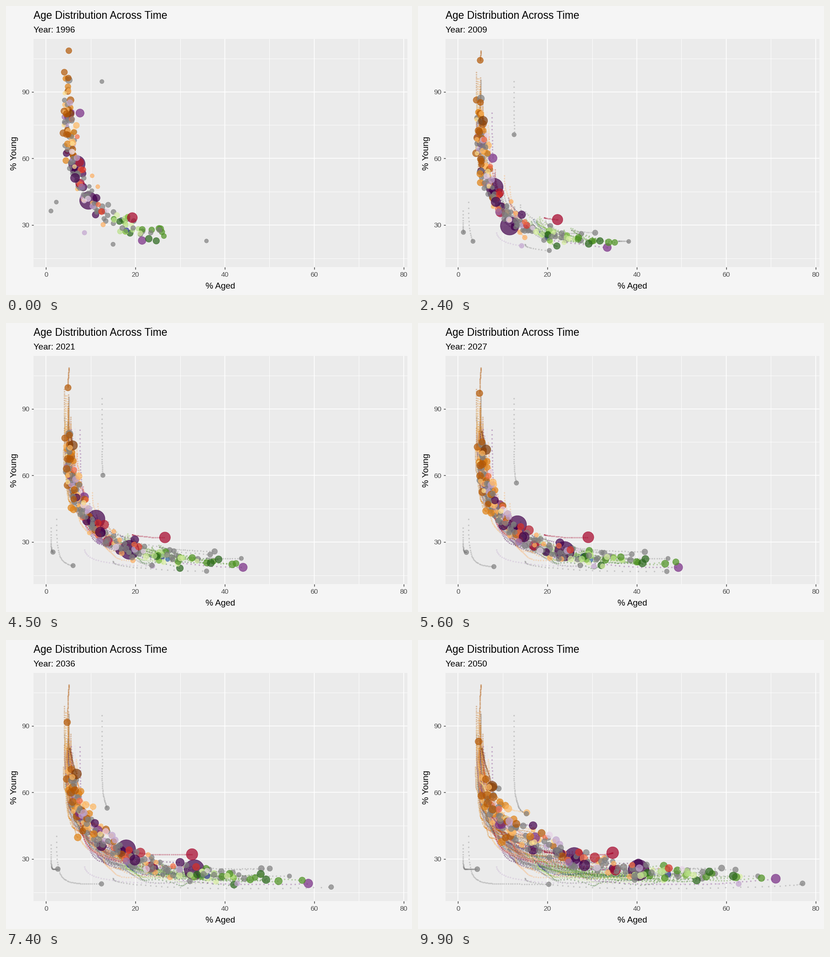
Recreate the animation shown at these times as a matplotlib script. Size 885 px wide and 632 px high, loop 10000 ms.

```python
import numpy as np
import matplotlib.pyplot as plt
from matplotlib.animation import FuncAnimation
from matplotlib.colors import to_rgba

W, H, DPI = 885, 632, 100
FRAMES, YEARS = 100, 54
PT = 72 / DPI
L, R, T, B = 60, 875, 72, 571          # panel edges in pixels
STEP = YEARS / (FRAMES - 1)
P = np.arange(YEARS + 1) / YEARS       # progress at each year

GREY = ["#7F7F7F"]
PURPLE = ["#40004B", "#762A83", "#9970AB", "#C2A5CF", "#E7D4E8"]
BROWN = ["#7F3B08", "#B35806", "#E08214", "#FDB863", "#FEE0B6"]
GREEN = ["#276419", "#4D9221", "#7FBC41", "#B8E186", "#D9F0A3"]
RED = ["#A50026", "#B2182B", "#D73027", "#F46D43", "#FDAE61", "#FEE090"]
BLUE = ["#313695", "#4575B4"]

rng = np.random.default_rng(7)
countries = []                         # (colour, radius, yearly positions)


def px(v):
    return 87.3 + 9.74 * v


def py(v):
    return 624.5 - 4.855 * v


def smooth(p):
    return p * p * (3 - 2 * p)


def track(color, r, start, end, power, decay, dip=0, ease=None, wobble=0.15):
    """Aged share grows by a power of time, young share decays exponentially."""
    gx = P ** power
    gx = ease(gx) if ease else gx
    gy = np.expm1(-decay * P) / np.expm1(-decay)
    (x0, y0), (x1, y1) = start, end
    fx, fy = rng.uniform(6, 24, 2)
    x = x0 + (x1 - x0) * gx
    x = x * (1 + 0.04 * wobble * np.sin(fx * P) * np.sin(np.pi * P))
    y = y0 + (y1 - y0) * gy - dip * np.sin(np.pi * P)
    y = y + wobble * np.sin(fy * P) * np.sin(np.pi * P)
    countries.append((color, r, np.stack([px(x), py(y)], 1)))


def crowd(n, lo, hi, ramp, big=6.8):
    """Countries at demographic stage u in [lo, hi]; darker shades are larger."""
    for u in rng.permutation(np.linspace(lo, hi, n)):
        shade = rng.integers(len(ramp))
        r = max(big - 0.6 * shade + rng.normal(0, 0.5), 4.2)
        wide = np.exp(rng.normal(0, 0.14 - 0.06 * u, 2))
        tall = np.exp(rng.normal(0, 0.06, 2))
        wide[1] *= wide[0] ** 0.5
        start = (4.8 + 20 * u ** 3) * wide[0], (26 + 70 * (1 - u) ** 1.4) * tall[0]
        end = (5.5 + 52 * u ** 1.5) * wide[1], (23 + 41 * (1 - u) ** 2.2) * tall[1]
        track(ramp[shade], r, start, end,
              power=2.5 - 1.2 * u + rng.uniform(-0.3, 0.3),
              decay=0.3 + 4 * u + rng.uniform(-0.2, 0.9),
              dip=2.5 * u * rng.uniform(0, 1), wobble=rng.uniform(0.2, 1))


# the countries that stand out
track(PURPLE[0], 19.3, (9.5, 41), (40.4, 25), 1.3, 5, ease=smooth)
track(PURPLE[0], 18, (6.9, 57.5), (26, 30.8), 1.9, 1.5)
track(PURPLE[0], 10, (6.5, 51.2), (28.3, 27.1), 1.7, 2)
track(PURPLE[1], 9, (7.6, 80.4), (17.2, 39.6), 3, 2.5)
track(PURPLE[1], 8.5, (21.5, 23), (71.1, 21.1), 1, 3, dip=3)
track(PURPLE[3], 5, (8.6, 26.5), (62.8, 18.8), 1.6, 6)
track(RED[0], 11, (19.3, 33.3), (34.6, 32.8), 0.9, 1, dip=1, ease=smooth)
track(RED[0], 9.5, (7.6, 48.7), (35.2, 25), 1.9, 3)
track(RED[1], 9, (7.5, 58.2), (30.6, 30.6), 1.8, 2.5)
track(BROWN[1], 6.5, (5.1, 108.5), (4.6, 82.9), 1, -0.9)
track(BROWN[0], 9.5, (5.3, 80), (7.6, 62.7), 1.5, -0.7)
track(BROWN[1], 7.5, (6.1, 61.3), (23.3, 31), 1.6, 4)
track(GREEN[0], 7.5, (23, 23.8), (61.6, 22.3), 1.3, 1, dip=2.5)
track(GREY[0], 7.5, (5.1, 95.3), (7.6, 52), 4, -0.6)
track(GREY[0], 4.3, (35.9, 22.8), (67.1, 22.3), 1.8, 1)
track(GREY[0], 4.7, (15, 21.3), (77.1, 19), 1.2, 1, dip=3, ease=smooth)
track(GREY[0], 4.7, (1.1, 36.3), (4.3, 25.4), 2.5, 9)
track(GREY[0], 4.5, (2.3, 40.3), (20.3, 18.6), 2, 7)
track(GREY[0], 4.5, (12.5, 94.6), (15.3, 50.4), 3, 3)

# everyone else
crowd(72, 0.08, 0.97, GREY, 5.2)
crowd(34, 0, 0.38, BROWN[1:4])
crowd(24, 0.12, 0.78, RED[2:] + BROWN[3:], 6.2)
crowd(26, 0.8, 1, GREEN, 7.2)
crowd(24, 0.12, 0.75, PURPLE, 7.8)
crowd(2, 0.82, 0.87, BLUE, 6)

# the two giants lie at the bottom, all others in mixed order
rest = countries[2:]
countries = countries[:2] + [rest[i] for i in rng.permutation(len(rest))]
colors = np.array([c for c, _, _ in countries])
radii = np.array([r for _, r, _ in countries])
paths = np.stack([p for _, _, p in countries])  # country, year, xy

# ---------- stage ----------
plt.rcParams["font.family"] = "Liberation Sans"
fig = plt.figure(figsize=(W / DPI, H / DPI), dpi=DPI, facecolor="#F5F5F5")
ax = fig.add_axes([0, 0, 1, 1])
ax.set(xlim=(0, W), ylim=(H, 0))
ax.axis("off")
ax.add_patch(plt.Rectangle((L, T), R - L, B - T, fc="#EBEBEB", lw=0, zorder=0))


def line(xs, ys, color, width):
    ax.plot(xs, ys, color=color, lw=width * PT, zorder=1, solid_capstyle="butt")


def label(x, y, s, size, color="black", ha="left", va="baseline", **kw):
    return ax.text(x, y, s, fontsize=size * PT, color=color, ha=ha, va=va, **kw)


for v in range(10, 80, 20):
    line([px(v)] * 2, [T, B], "white", 0.9)
for v in range(15, 106, 30):
    line([L, R], [py(v)] * 2, "white", 0.9)
for v in range(0, 81, 20):
    line([px(v)] * 2, [T, B], "white", 1.6)
    line([px(v)] * 2, [B, B + 4.5], "#333333", 1.4)
    label(px(v), 592.5, str(v), 15, "#4D4D4D", "center")
for v in (30, 60, 90):
    line([L, R], [py(v)] * 2, "white", 1.6)
    line([L - 4.5, L], [py(v)] * 2, "#333333", 1.4)
    label(51.5, py(v) + 5.5, str(v), 15, "#4D4D4D", "right")

label(59.5, 28, "Age Distribution Across Time", 22.8)
year = label(59.5, 58.5, "", 18.9)
label(467.5, 618, "% Aged", 18.8, ha="center")
label(18.5, 322, "% Young", 18.8, ha="center", va="center", rotation=90)

trails = []
for c in dict.fromkeys(colors):
    dots, = ax.plot([], [], "o", color=c, alpha=0.28, ms=2.5 * PT, mew=0.8 * PT, zorder=2)
    trails.append((dots, paths[colors == c]))

bubbles = ax.scatter(*paths[:, 0].T, c=[to_rgba(c, 0.7) for c in colors],
                     linewidths=0.9 * PT, zorder=3)


def draw(i):
    t = i * STEP
    k = min(int(t + 1e-9), YEARS - 1)
    f = t - k
    bubbles.set_offsets(paths[:, k] * (1 - f) + paths[:, k + 1] * f)
    bubbles.set_sizes((2 * radii * (1 + 0.18 * t / YEARS) * PT) ** 2)
    past = int(np.ceil(t - 1e-9))
    for dots, p in trails:
        dots.set_data(p[:, :past, 0].ravel(), p[:, :past, 1].ravel())
    year.set_text(f"Year: {1996 + round(t)}")
    return [bubbles, year] + [d for d, _ in trails]


anim = FuncAnimation(fig, draw, frames=FRAMES, interval=1000 // 10, repeat=True)
plt.show()
```
